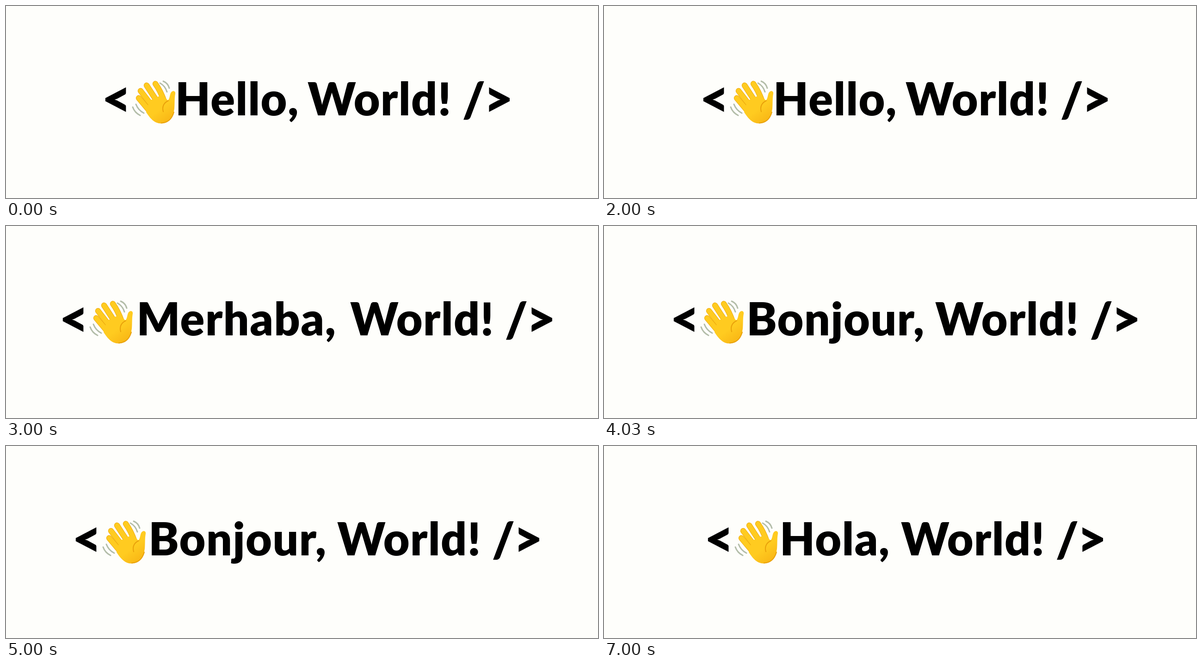
Recreate the animation shown at these times as an HTML page. Size 1280 by 416 pixels, loop 8000 ms.

```html
<!DOCTYPE html>
<html lang="en">
<head>
<meta charset="utf-8">
<title>Hello, World!</title>
<style>
  html, body { margin: 0; width: 100%; height: 100%; overflow: hidden; background: #fefefb; }
  svg { display: block; width: 100%; height: 100%; }
  text { font-family: Lato, sans-serif; font-weight: 900; fill: #000; }
  .fingers path { fill: none; stroke-linecap: round; }
  .rim { stroke: #eca70c; stroke-width: 12.4; }
  .skin { stroke: #ffcb20; stroke-width: 10.6; }
  .crease { fill: none; stroke: #e9a10b; stroke-width: 2; stroke-linecap: round; }
  .swish { fill: none; stroke: #b3bda9; stroke-width: 3; stroke-linecap: round; }
</style>
</head>
<body>
<svg viewBox="0 0 1280 416">
  <defs>
    <linearGradient id="palm" x1="0.2" y1="0.1" x2="0.8" y2="1">
      <stop offset="0.5" stop-color="#ffcb20"/>
      <stop offset="1" stop-color="#f8b414"/>
    </linearGradient>
  </defs>
  <g id="left">
    <g class="swish">
      <path d="M340 163Q350 167 353 178"/>
      <path d="M333 167Q344 173 348 186"/>
      <path d="M274 219Q278 231 290 237"/>
      <path d="M281 213Q286 226 298 232"/>
    </g>
    <g class="fingers" id="fingers"></g>
    <path fill="url(#palm)" d="M303 223L313 204L336 193L346 200Q350 207 352 202
      C355 196 354 190 358 186C362 182 367 185 366 190C364 201 365 211 364 222
      C362 240 352 254.500 335 254.500C321 254.500 311 243 303 230Z"/>
    <path class="crease" d="M351 205C341 210 337 218 340 229"/>
    <path class="crease" d="M363 230C359 244 350 253 336 253.500"/>
  </g>
  <g id="right"></g>
</svg>
<script>
const LOOP = 8000, BASELINE = 237, SIZE = 98, SPACING = 1.5;

// spread: how far the two sides move apart to make room for the greeting
const slides = [
  { at: 0,    word: 'Hello,',   center: 501,   spread: 0 },
  { at: 2030, word: 'Merhaba,', center: 499.5, spread: 92 },
  { at: 4030, word: 'Bonjour,', center: 502,   spread: 64 },
  { at: 6030, word: 'Hola,',    center: 500.5, spread: -10 }
];

const SVG = 'http://www.w3.org/2000/svg';
const byId = id => document.getElementById(id);
const stage = document.querySelector('svg');
const pen = document.createElement('canvas').getContext('2d');

function add(parent, tag, attributes) {
  const node = parent.appendChild(document.createElementNS(SVG, tag));
  for (const name in attributes) node.setAttribute(name, attributes[name]);
  return node;
}

// Centres the ink on x, and on y as well when no baseline is wanted.
function addText(parent, string, x, y, size, onBaseline) {
  pen.font = `900 ${size}px Lato, sans-serif`;
  const ink = pen.measureText(string);
  const spaced = SPACING * (string.length - 1);
  const node = add(parent, 'text', {
    x: x - (ink.actualBoundingBoxRight - ink.actualBoundingBoxLeft + spaced) / 2,
    y: onBaseline ? y : y + (ink.actualBoundingBoxAscent - ink.actualBoundingBoxDescent) / 2,
    'font-size': size,
    'letter-spacing': SPACING
  });
  node.textContent = string;
  return node;
}

const fingers = [
  'M323 168.500Q334 184 342 206',
  'M304 172L330 212',
  'M291 184L318 219',
  'M287 199.500L310 227'
];
for (const d of fingers) {
  add(byId('fingers'), 'path', { d, class: 'rim' });
  add(byId('fingers'), 'path', { d, class: 'skin' });
}

const left = byId('left'), right = byId('right');
addText(left, '<', 237, 202.5, 110);
addText(right, 'World!', 804.5, BASELINE, SIZE, true);
addText(right, '/', 1011.5, 205, 104);
addText(right, '>', 1066.5, 202.5, 110);
for (const slide of slides) {
  slide.node = addText(stage, slide.word, slide.center, BASELINE, SIZE, true);
}

function draw(now) {
  const time = now % LOOP;
  const current = slides.filter(slide => slide.at <= time).pop() || slides[0];
  for (const slide of slides) {
    slide.node.setAttribute('visibility', slide === current ? 'visible' : 'hidden');
  }
  left.setAttribute('transform', `translate(${-current.spread})`);
  right.setAttribute('transform', `translate(${current.spread})`);
}

const start = performance.now();
function tick() {
  draw(performance.now() - start);
  requestAnimationFrame(tick);
}
draw(0);
requestAnimationFrame(tick);
</script>
</body>
</html>
```
